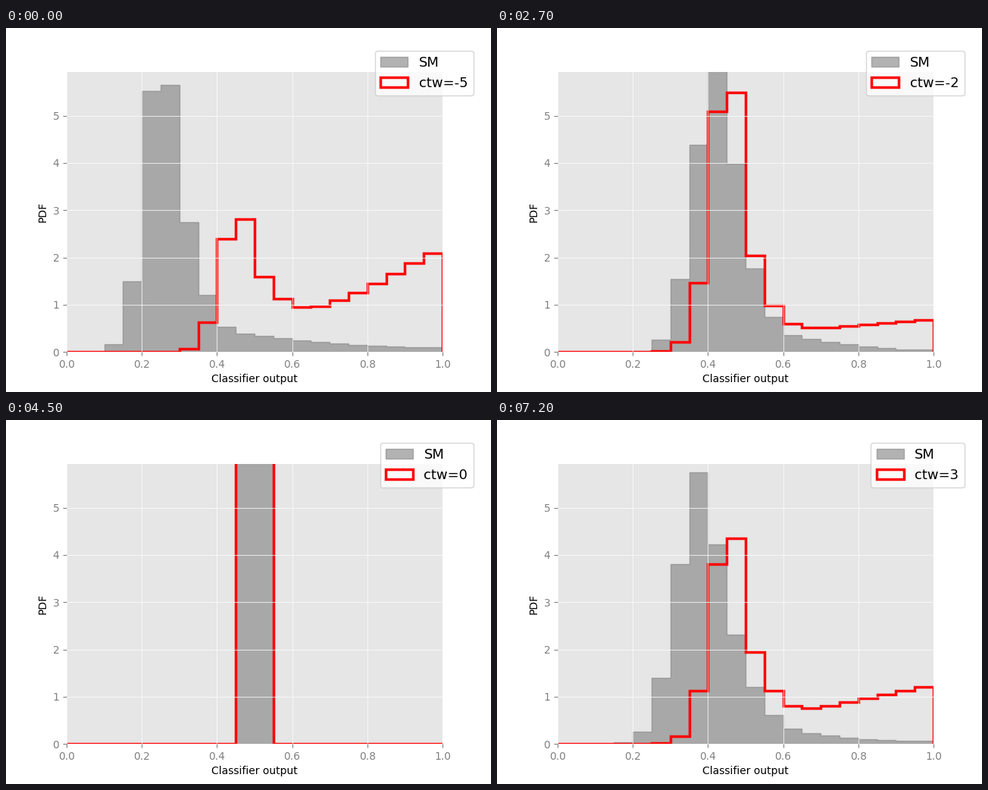
Recreate the animation shown at these times as a matplotlib script. Size 640 by 480 pixels, loop 8 s.

```python
import matplotlib.pyplot as plt
import numpy as np
from matplotlib.animation import FuncAnimation

BINS = 20
EDGES = np.linspace(0, 1, BINS + 1)
CENTERS = (EDGES[:-1] + EDGES[1:]) / 2
STEP_MS, HOLD_MS, LOOP_MS = 100, 900, 8000
CTW_PEAK = 7  # first of the four tall bins


def peak(first, heights):
    """Peak through four bins: one over a rising plus a falling exponential.

    Such reciprocals obey y[i] = a*y[i-1] + b*y[i-2], which extends them
    to both sides; the left flank is damped further.
    """
    y = np.zeros(BINS)
    y[first:first + 4] = y0, y1, y2, y3 = 1 / np.array(heights)
    a, b = np.linalg.solve([[y1, y0], [y2, y1]], [y2, y3])
    for i in range(first + 4, BINS):
        y[i] = a * y[i - 1] + b * y[i - 2]
    for i in range(first - 1, -1, -1):
        y[i] = (y[i + 2] - a * y[i + 1]) / b
    k = np.maximum(first - np.arange(BINS), 0)
    return 0.6 ** (k * (k + 1) / 2) / y


def sm_density(c, first, heights):
    """Peak that fades into a flat tail."""
    tail = (2.3 - 0.25 * abs(c)) * (1 - CENTERS) ** 2 + 0.02 * abs(c)
    tail[:first + 4] = 0
    return np.maximum(peak(first, heights), tail)


def ctw_density(c, heights, end):
    """Peak plus a tail that climbs to `end` at the right edge."""
    ramp = np.clip(2 * CENTERS - 1, 0, 1) ** (0.2 * abs(c))
    ramp[:CTW_PEAK + 4] = 0
    return peak(CTW_PEAK, heights) + end * ramp


def between(a, b):
    """Normalised geometric mean of two densities."""
    mid = np.sqrt(a * b)
    return mid * BINS / mid.sum()


# coefficient: first tall SM bin, SM peak, ctw peak, end of the ctw tail
SHAPES = {
    -5: (3, (1.5, 5.53, 5.65, 2.75), (0.63, 2.4, 2.81, 1.59), 2.2),
    -4: (4, (2.25, 5.7, 4.96, 2.52), (0.77, 2.91, 3.28, 1.72), 1.85),
    -3: (5, (1.9, 4.96, 5.44, 3.29), (1.06, 3.7, 4.13, 1.73), 1.4),
    -1: (7, (2.33, 7.2, 6.04, 2.28), (1.81, 6.2, 6.48, 2.15), 0.3),
    1: (7, (2.1, 7.3, 6.27, 2.39), (1.87, 6.1, 6.32, 2.2), 0.3),
    3: (5, (1.4, 3.8, 5.75, 4.22), (1.13, 3.8, 4.35, 1.94), 1.25),
}

sm, ctw = {}, {}
for c, (first, sm_peak, ctw_peak, end) in SHAPES.items():
    sm[c] = sm_density(c, first, sm_peak)
    ctw[c] = ctw_density(c, ctw_peak, end)

# without a coefficient both samples look alike
sm[0] = ctw[0] = np.where(abs(CENTERS - 0.5) < 0.05, BINS / 2, 0)
for family in (sm, ctw):
    for c in (-2, 2):
        family[c] = between(family[c - 1], family[c + 1])

fig, ax = plt.subplots(figsize=(6.4, 4.8), dpi=100)
ax.set_facecolor("#E6E6E6")
ax.set_axisbelow(False)
ax.grid(color="w", linestyle="solid", alpha=0.7)
for spine in ax.spines.values():
    spine.set_visible(False)
ax.tick_params(colors="gray", direction="out")
ax.set_xlabel("Classifier output")
ax.set_ylabel("PDF")


def draw_hist(heights, **style):
    return ax.hist(CENTERS, EDGES, weights=heights, **style)[2][0]


pairs = {}
for c in range(-5, 4):
    pairs[c] = (
        draw_hist(sm[c], histtype="stepfilled", color="gray", ec="gray",
                  alpha=0.6),
        draw_hist(ctw[c], histtype="step", color="red", lw=2.5),
    )
ax.set_xlim(0, 1)
ax.set_ylim(0, 1.05 * sm[-5].max())


def update(i):
    current = -5 + i * STEP_MS // HOLD_MS
    for c, pair in pairs.items():
        for patch in pair:
            patch.set_visible(c == current)
    ax.legend(pairs[current], ("SM", f"ctw={current}"), fontsize=13,
              loc="upper right", bbox_to_anchor=(1.1, 1.1))
    return []


anim = FuncAnimation(fig, update, frames=LOOP_MS // STEP_MS,
                     interval=STEP_MS, repeat=True, blit=False)
plt.show()
```
